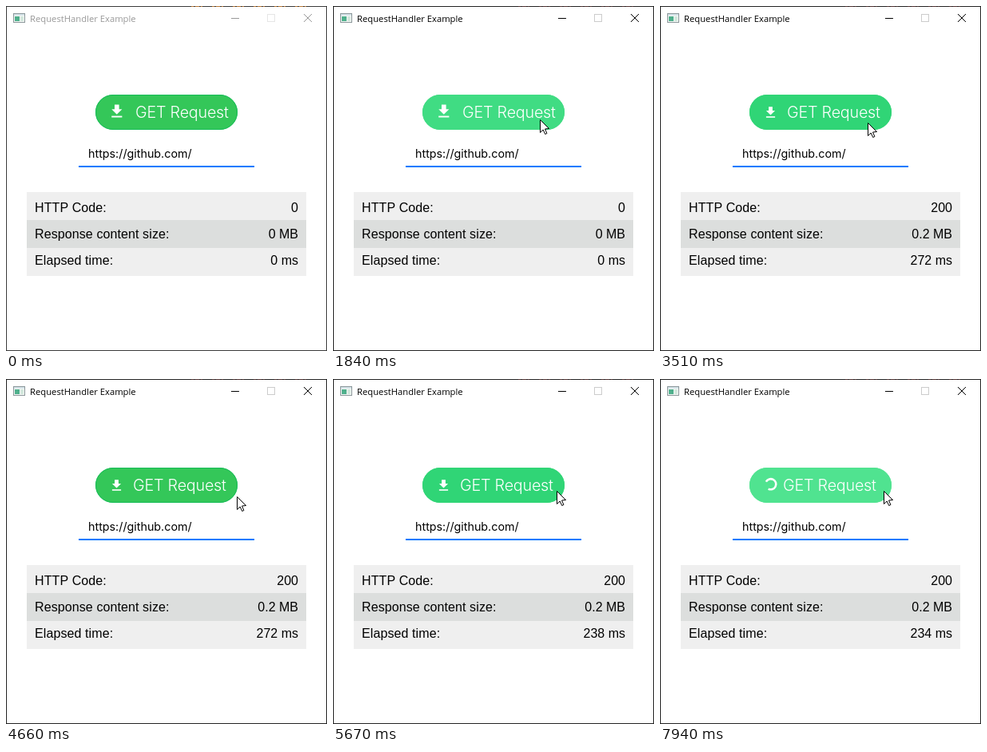
An HTML page with a canvas that plays this animation: 402 by 432 pixels, repeating every 8000 ms.

```html
<!DOCTYPE html>
<html lang="en">
<head>
<meta charset="utf-8">
<title>RequestHandler Example</title>
<style>
html, body { margin: 0; width: 100%; height: 100%; overflow: hidden; background: #fff; }
canvas { display: block; }
</style>
</head>
<body>
<canvas id="stage" width="402" height="432"></canvas>
<script>
const ctx = document.getElementById('stage').getContext('2d');
const LOOP = 8000;
const ENTER = 360;   // pointer comes into the window
const FADE = 100;    // length of a button colour transition
const BUTTON = { x: 112, y: 111, w: 178, h: 44 };

// Straight pointer moves; the pointer rests between them.
const START = { x: 350, y: 424 };
const MOVES = [
  { from: ENTER, to: 1120, x: 282, y: 172 },
  { from: 1120, to: 1330, x: 266, y: 154 },
  { from: 1330, to: 1470, x: 259, y: 142 },
  { from: 3440, to: 3760, x: 262, y: 159 },
  { from: 4040, to: 4380, x: 300, y: 148 },
  { from: 4380, to: 4660, x: 289, y: 147 },
  { from: 4660, to: 4950, x: 280, y: 140 }
];

// A click holds the button down and sends a request lasting ms.
const click = (down, ms) => ({ down, up: down + 330, send: down + 100, ms });
const CLICKS = [
  { down: 1650, up: 1790, send: 2020, ms: 272 },
  click(5140, 238), click(6590, 234), click(7840, 234)
];

const SHADES = [[52, 199, 89], [48, 213, 118], [80, 227, 144]];  // rest, hover, pressed
const EDGE = [22, 188, 88];

const clamp = k => Math.max(0, Math.min(1, k));
const lerp = (a, b, k) => a + (b - a) * k;
const mix = (a, b, k) => a.map((v, i) => lerp(v, b[i], k));
const rgb = c => `rgb(${c.map(Math.round).join(',')})`;

function pointerAt(t) {
  return MOVES.reduce((p, m) => {
    const k = clamp((t - m.from) / (m.to - m.from));
    return { x: lerp(p.x, m.x, k), y: lerp(p.y, m.y, k) };
  }, START);
}

function stateAt(t) {
  if (CLICKS.some(c => t >= c.down && t < c.up)) return 2;
  const p = pointerAt(t);
  const over = p.x < BUTTON.x + BUTTON.w - 2 && p.y < BUTTON.y + BUTTON.h - 1;
  return over ? 1 : 0;
}

// Averaging the recent states gives a linear fade between them.
function levelAt(t) {
  const n = 20;
  let sum = 0;
  for (let i = 0; i < n; i++) sum += stateAt(t - FADE * (i + 0.5) / n);
  return sum / n;
}

function rect(x, y, w, h, color) {
  ctx.fillStyle = color;
  ctx.fillRect(x, y, w, h);
}

function text(str, x, y, font, color, align = 'left', spacing = '0px') {
  ctx.font = font;
  ctx.letterSpacing = spacing;
  ctx.textAlign = align;
  ctx.fillStyle = color;
  ctx.fillText(str, x, y);
}

function line(x1, y1, x2, y2, color) {
  ctx.strokeStyle = color;
  ctx.lineWidth = 1;
  ctx.beginPath();
  ctx.moveTo(x1, y1);
  ctx.lineTo(x2, y2);
  ctx.stroke();
}

function box(x, y, w, h, color) {
  ctx.strokeStyle = color;
  ctx.lineWidth = 1;
  ctx.strokeRect(x + 0.5, y + 0.5, w - 1, h - 1);
}

function drawWindow(active) {
  const ink = active ? '#000' : '#999';
  rect(0, 0, 402, 432, '#fff');
  box(0, 0, 402, 432, active ? '#242424' : '#3b3b3b');

  // Traces of the window behind, along the top edge.
  ctx.setLineDash([3, 2, 5, 2, 2, 12]);
  line(232, 0.5, 385, 0.5, active ? '#503030' : '#b87836');
  ctx.setLineDash([]);

  rect(9, 9, 15, 12, '#8b979a');
  rect(10, 10, 13, 2, '#d5e3e8');
  rect(10, 12, 13, 8, '#f4f7f5');
  rect(11, 13, 6, 6, '#4fb08c');
  rect(18, 13, 4, 6, '#d3e8dd');

  text('RequestHandler Example', 30, 20, '11.25px "Open Sans", sans-serif', ink);
  line(282, 15.5, 292, 15.5, ink);
  box(327, 10, 10, 10, active ? '#ccc' : '#e6e6e6');
  line(373, 10, 383, 20, ink);
  line(383, 10, 373, 20, ink);
}

function drawIcon(x, y, scale) {
  ctx.save();
  ctx.translate(x, y);
  ctx.scale(scale, scale);
  rect(-3, -8.5, 6, 7, '#fff');
  ctx.beginPath();
  ctx.moveTo(-7, -2.5);
  ctx.lineTo(7, -2.5);
  ctx.lineTo(0, 4.5);
  ctx.fill();
  rect(-7, 6.5, 14, 2, '#fff');
  ctx.restore();
}

function drawSpinner(age) {
  const from = -Math.PI * 0.85 + age / 1000 * Math.PI * 2;
  ctx.strokeStyle = '#fff';
  ctx.lineWidth = 2.6;
  ctx.beginPath();
  ctx.arc(138.7, 131.7, 6.6, from, from + Math.PI * 1.5);
  ctx.stroke();
}

function drawButton(t, running, done) {
  const { x, y, w, h } = BUTTON;
  const level = levelAt(t);
  const i = Math.min(1, Math.floor(level));
  const fill = mix(SHADES[i], SHADES[i + 1], level - i);
  ctx.fillStyle = rgb(fill);
  ctx.beginPath();
  ctx.roundRect(x, y, w, h, h / 2);
  ctx.fill();
  ctx.strokeStyle = rgb(mix(EDGE, fill, clamp(level)));
  ctx.lineWidth = 1;
  ctx.beginPath();
  ctx.roundRect(x + 0.5, y + 0.5, w - 1, h - 1, (h - 1) / 2);
  ctx.stroke();

  if (running) drawSpinner(t - running.send);
  else if (done) drawIcon(138.5, 133, 0.8);
  else drawIcon(138.8, 131.5, 0.94);

  const labelX = running ? 154 : done ? 159 : 162;
  text('GET Request', labelX, 140, '300 19.7px Inter, sans-serif', '#fff', 'left', '-0.2px');
}

function drawTable(done) {
  rect(26, 233, 350, 105, '#efefef');
  rect(26, 268, 350, 35, '#dcdedd');
  const rows = [
    ['HTTP Code:', done ? '200' : '0'],
    ['Response content size:', done ? '0.2 MB' : '0 MB'],
    ['Elapsed time:', `${done ? done.ms : 0} ms`]
  ];
  const font = '16px "Liberation Sans", Arial, sans-serif';
  rows.forEach(([label, value], i) => {
    const y = 258 + i * 33;
    text(label, 36, y, font, '#000', 'left', '0.1px');
    text(value, 366, y, font, '#000', 'right');
  });
}

function drawPointer(t) {
  if (t < ENTER) return;
  const p = pointerAt(t);
  ctx.save();
  ctx.translate(Math.round(p.x) + 0.5, Math.round(p.y) + 0.5);
  const arrow = new Path2D('M0 0V16L3.7 12.5L6.2 18L8.4 17L6 11.5L11 11Z');
  ctx.fillStyle = '#fff';
  ctx.fill(arrow);
  ctx.strokeStyle = '#000';
  ctx.lineWidth = 1;
  ctx.stroke(arrow);
  ctx.restore();
}

function draw(t) {
  const running = CLICKS.find(c => t >= c.send && t < c.send + c.ms);
  const done = CLICKS.filter(c => t >= c.send + c.ms).pop();
  drawWindow(t >= CLICKS[0].down);
  drawButton(t, running, done);
  text('https://github.com/', 103, 190, '14.3px Inter, sans-serif', '#000');
  rect(91, 200, 220, 2, '#007aff');
  drawTable(done);
  drawPointer(t);
}

const origin = performance.now();
function tick() {
  draw((performance.now() - origin) % LOOP);
  requestAnimationFrame(tick);
}
tick();
</script>
</body>
</html>
```
